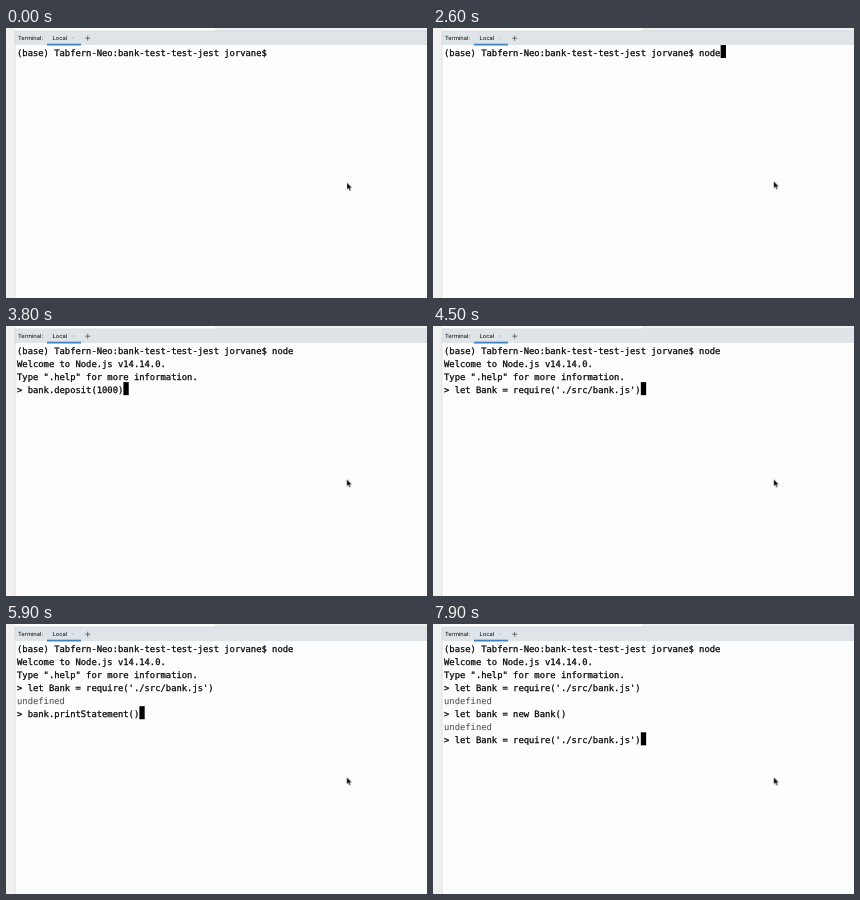
An HTML page that plays this animation: 421 by 270 pixels, repeating every 8000 ms.

```html
<!DOCTYPE html>
<html lang="en">
<head>
<meta charset="utf-8">
<title>Terminal session</title>
<style>
  html, body { margin: 0; width: 100%; height: 100%; overflow: hidden; background: #fdfdfd; }
  svg { display: block; width: 421px; height: 270px; }
  text { white-space: pre; text-rendering: geometricPrecision; }
  .ui { font: 500 5.7px Inter, sans-serif; fill: #222; }
  #screen text {
    font: 8.837px "DejaVu Sans Mono", monospace;
    fill: #080808; stroke: #080808; stroke-width: .28px;
  }
  #screen text.result { fill: #555; stroke: #555; stroke-width: .1px; }
  #pointer { animation: nudge 8s step-end infinite; }
  @keyframes nudge {
    0% { transform: translate(341px, 154.6px); }
    1.25% { transform: translate(340.8px, 153.8px); }
    2.5%, 100% { transform: translate(340.7px, 153.2px); }
  }
</style>
</head>
<body>
<svg viewBox="0 0 421 270">
  <rect width="421" height="270" fill="#fdfdfd"/>
  <rect width="9" height="270" fill="#f1f1f1"/>
  <rect x="209" width="212" height="3" fill="#eeeff0"/>
  <rect x="9" y="3" width="412" height="14" fill="#dfe4e8"/>
  <path d="M9 2.8H421" stroke="#cfd3d6" stroke-width=".6"/>
  <path d="M9 3V270" stroke="#d4d4d4" stroke-width=".7"/>
  <rect x="41" y="15.7" width="34" height="1.8" fill="#3f82c4"/>
  <text class="ui" x="12" y="12.4">Terminal:</text>
  <text class="ui" x="46.5" y="12.4">Local</text>
  <path d="M66.2 9.2l2.2 2.2m0-2.2l-2.2 2.2" stroke="#b4b9bd" stroke-width=".6"/>
  <path d="M79.2 10.2h5m-2.5-2.5v5" stroke="#555" stroke-width=".8"/>
  <g id="screen"></g>
  <rect id="cursor" width="5.32" height="13.04" fill="#000"/>
  <path id="pointer" d="M0 0V7.1L1.6 5.6L2.7 8.2L3.9 7.7L2.8 5.2H5Z"
        fill="#000" stroke="#fff" stroke-width=".3"/>
</svg>
<script>
  const LOOP = 8000, LEFT = 11, TOP = 17, COL = 5.32, ROW = 13.04;
  const SHELL = '(base) Tabfern-Neo:bank-test-test-jest jorvane$ ';
  const REQUIRE = "let Bank = require('./src/bank.js')";
  const CREATE = 'let bank = new Bank()';
  const PRINT = 'bank.printStatement()';
  const WITHDRAW = 'bank.withdraw(500)';
  const DEPOSIT = 'bank.deposit(1000)';

  const transcript = [
    SHELL + 'node',
    'Welcome to Node.js v14.14.0.',
    'Type ".help" for more information.',
    '> ' + REQUIRE,
    'undefined',
    '> ' + CREATE,
    'undefined'
  ];

  // [start ms, finished rows, current input, cursor hidden]
  const steps = [
    [0, 0, '', true],
    [200, 0, ''],
    [700, 0, '', true],
    [1100, 0, 'clear'],
    [1600, 0, 'node'],
    [2000, 0, 'clear'],
    [2500, 0, 'node'],
    [2900, 3, ''],
    [3400, 3, PRINT],
    [3600, 3, WITHDRAW],
    [3800, 3, DEPOSIT],
    [4000, 3, CREATE],
    [4500, 3, REQUIRE],
    [5000, 3, REQUIRE, true],
    [5200, 5, ''],
    [5500, 5, REQUIRE],
    [5900, 5, PRINT],
    [6100, 5, WITHDRAW],
    [6200, 5, DEPOSIT],
    [6600, 5, CREATE],
    [7400, 7, ''],
    [7800, 7, CREATE],
    [7900, 7, REQUIRE]
  ];

  const screen = document.getElementById('screen');
  const cursor = document.getElementById('cursor');
  const rows = Array.from({ length: 8 }, (_, i) => {
    const row = document.createElementNS('http://www.w3.org/2000/svg', 'text');
    row.setAttribute('x', LEFT);
    row.setAttribute('y', TOP + 10.75 + i * ROW);
    return screen.appendChild(row);
  });

  let shown;
  function show(step) {
    if (step === shown) return;
    shown = step;
    const [, done, input, hidden] = step;
    const line = (done ? '> ' : SHELL) + input;
    rows.forEach((row, i) => {
      const text = i < done ? transcript[i] : i === done ? line : '';
      row.textContent = text;
      row.classList.toggle('result', text === 'undefined');
    });
    cursor.setAttribute('x', LEFT + line.length * COL);
    cursor.setAttribute('y', TOP + done * ROW);
    cursor.style.visibility = hidden ? 'hidden' : 'visible';
  }

  const pointerMotion = document.getElementById('pointer').getAnimations()[0];
  let start;
  function tick(now) {
    start ??= pointerMotion?.startTime ?? now;
    const time = Math.max(0, now - start) % LOOP;
    show(steps.findLast(step => step[0] <= time));
    requestAnimationFrame(tick);
  }
  show(steps[0]);
  requestAnimationFrame(tick);
</script>
</body>
</html>
```
